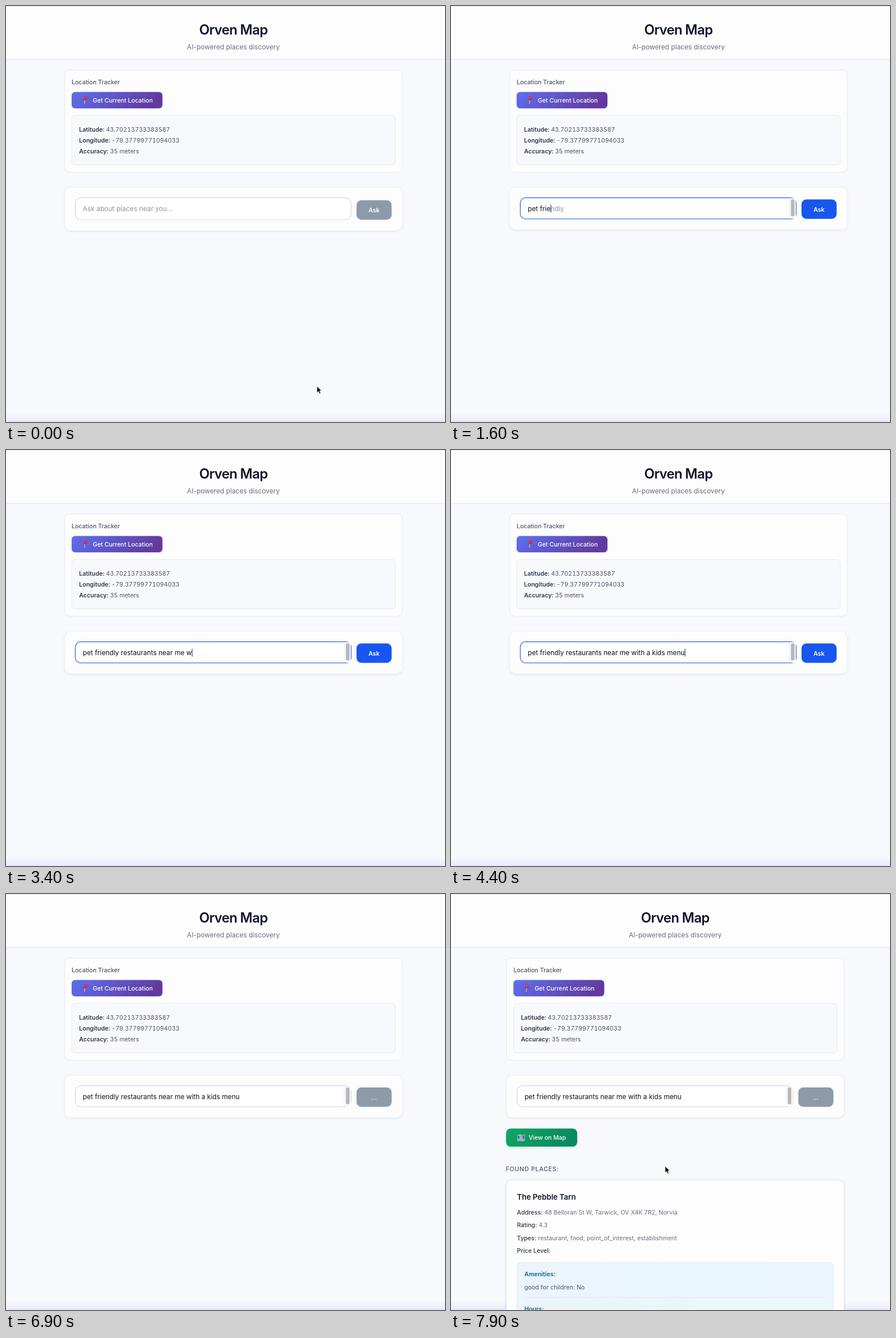
Write an HTML page that moves like this. It is 769 px wide and 728 px high and loops after 8 s.

```html
<!DOCTYPE html>
<html lang="en">
<head>
<meta charset="utf-8">
<title>Orven Map</title>
<style>
html, body { margin: 0; width: 100%; height: 100%; overflow: hidden; background: #f7f9fd; }
svg { display: block; width: 769px; height: 728px; font: 10.55px Inter, "Open Sans", sans-serif; }
text { white-space: pre; fill: #4c5568; }
.title { font-size: 23.7px; font-weight: 600; letter-spacing: -.7px; fill: #10132a; }
.sub { font-size: 11.75px; fill: #6b6f7e; }
.mid { font-weight: 500; }
.bold { font-weight: 600; fill: #30394b; }
.digits { font-variant-numeric: tabular-nums; }
.white { font-weight: 500; fill: #fff; }
.field { font-size: 11.75px; fill: #0e1016; }
.faint { fill: #8f929e; }
.label { font-weight: 500; fill: #2d3648; }
.value { fill: #686f7e; }
.blue { font-weight: 600; fill: #0f6596; }
.name { font-size: 13.1px; font-weight: 600; fill: #12162a; }
.caps { font-weight: 500; letter-spacing: .65px; fill: #50566c; }
.card { fill: #fdfdfd; stroke: #e6e8f2; }
.soft { filter: drop-shadow(0 1.5px 2px rgba(40, 44, 80, .13)); }
.glow { filter: drop-shadow(0 1px 1.5px rgba(80, 90, 190, .2)); }
.leaf { filter: drop-shadow(0 1.5px 2px rgba(20, 165, 100, .25)); }
</style>
</head>
<body>
<svg viewBox="0 0 769 728">
  <defs>
    <linearGradient id="violet" x1="0" y1="0" x2="1" y2=".2">
      <stop stop-color="#5d70ef"/><stop offset="1" stop-color="#623a9e"/>
    </linearGradient>
    <linearGradient id="green" x1="0" y1="0" x2="1" y2=".2">
      <stop stop-color="#12a563"/><stop offset="1" stop-color="#078a5f"/>
    </linearGradient>
    <linearGradient id="ice" x2="1">
      <stop stop-color="#ecf4fc"/><stop offset=".5" stop-color="#e9f7fb"/><stop offset="1" stop-color="#ecf7fc"/>
    </linearGradient>
    <linearGradient id="edge" x2="0" y2="1">
      <stop stop-color="#ecebfb" stop-opacity="0"/><stop offset="1" stop-color="#e9e8fa"/>
    </linearGradient>
  </defs>

  <rect width="769" height="728" fill="#f7f9fd"/>
  <rect width="769" height="93" fill="#fdfdfd"/>
  <path d="M0 .5H769M0 93.5H769" stroke="#e6e7f4"/>
  <rect y="712" width="769" height="16" fill="url(#edge)"/>

  <g id="page">
    <text class="title" x="398.3" y="50.3" text-anchor="middle">Orven Map</text>
    <text class="sub" x="398.3" y="75.6" text-anchor="middle">AI-powered places discovery</text>

    <rect class="card" x="103" y="112" width="591" height="179" rx="9"/>
    <text class="mid" x="115" y="137">Location Tracker</text>
    <rect class="glow" x="115" y="150.5" width="159" height="28.5" rx="6" fill="url(#violet)"/>
    <path d="M138.5 163L137.4 171" stroke="#b9bccb" stroke-width="1.3"/>
    <circle cx="138.8" cy="161.7" r="3.2" fill="#d8283c"/>
    <circle cx="137.9" cy="160.8" r=".9" fill="#f58a90"/>
    <text class="white" x="152" y="168.9">Get Current Location</text>
    <rect x="115" y="191.5" width="567" height="86.5" rx="6" fill="#f8f9fc" stroke="#e8e9f2"/>
    <g class="digits">
      <text x="128" y="219.8"><tspan class="bold">Latitude:</tspan> 43.70213733383587</text>
      <text x="128" y="239.2"><tspan class="bold">Longitude:</tspan> -79.37799771094033</text>
      <text x="128" y="258.4"><tspan class="bold">Accuracy:</tspan> 35 meters</text>
    </g>

    <rect id="panel" class="soft" x="103" y="317.5" width="591" height="75.5" rx="11" fill="#fdfdfd"/>
    <rect id="ring" x="119.7" y="334" width="486.6" height="42" rx="10.5" fill="#e6edfd"/>
    <rect id="box" x="121.5" y="335.7" width="483" height="38.3" rx="9" fill="#fff" stroke-width="1.2"/>
    <g id="bar">
      <rect x="592.5" y="336.3" width="11.4" height="35.6" fill="#fdfdfd"/>
      <path d="M592.5 337V372" stroke="#ececf2"/>
      <rect x="595.4" y="338.3" width="6.4" height="30" rx="3" fill="#b7b7b9"/>
    </g>
    <text id="hint" class="field faint" x="134.5" y="359.4">Ask about places near you...</text>
    <text class="field" x="134.5" y="359.4"><tspan id="typed"></tspan><tspan id="guess" class="faint"></tspan></text>
    <rect id="caret" y="348" width="1.4" height="13.5" fill="#2466dd"/>
    <g id="ask">
      <rect x="614" y="340" width="61.5" height="34" rx="8.5"/>
      <text id="askText" class="white" style="font-weight:600" x="644.6" y="361.4" text-anchor="middle">Ask</text>
    </g>
  </g>

  <g id="results">
    <rect class="leaf" x="96.5" y="410.5" width="124.5" height="31.5" rx="8" fill="url(#green)"/>
    <path d="M116 421.5l4.5-1 4.5 1 4.5-1v11.5l-4.5 1-4.5-1-4.5 1z" fill="#86b6cc"/>
    <path d="M117 423l3 0 1.5 3-2 3.5-2.5-3zM124 422.5l4.5 0v5l-3 2z" fill="#456f7c"/>
    <path d="M120.5 420.5v11.5M125 421.5v11.5" stroke="#cfe2ea" stroke-width=".7"/>
    <text class="white" x="136" y="430.4">View on Map</text>
    <text class="caps" x="96" y="485.3">FOUND PLACES:</text>
    <rect class="card soft" x="97" y="501" width="591.5" height="260" rx="9"/>
    <text class="name" x="115.5" y="534.6">The Pebble Tarn</text>
    <g id="facts"></g>
    <rect x="115.5" y="645" width="554.5" height="110" rx="6" fill="url(#ice)" stroke="#e2ebf7"/>
    <text class="blue" x="128.5" y="669.4">Amenities:</text>
    <text x="128.5" y="691.9">good for children: No</text>
    <path d="M128.5 706H657" stroke="#e0eaf5"/>
    <text class="blue" x="128.5" y="730.3">Hours:</text>
  </g>

  <g id="pointer">
    <path d="M0 0V11.8L2.7 9.3 4.6 13.5 6.7 12.6 4.9 8.5H8.5Z" fill="#0a0a0c" stroke="#fff" stroke-width=".9" stroke-linejoin="round"/>
    <g id="ban" fill="none">
      <circle cx="7" cy="18.5" r="5.9" fill="#f4f4f6" stroke="#fff" stroke-width="2.6"/>
      <path d="M3.2 14.7L10.8 22.3" stroke="#95979f" stroke-width="1.5"/>
      <circle cx="7" cy="18.5" r="5.5" stroke="#95979f" stroke-width="1.5"/>
    </g>
  </g>
</svg>
<script>
const LOOP = 8000, STEP = 100;
const QUERY = "pet friendly restaurants near me with a kids menu";
const GREY = [140, 154, 170], BLUE = [24, 86, 240], DARK = [12, 67, 224];
const IDLE = [211, 213, 234], FOCUS = [58, 108, 226];

// Each track is a list of [time, value or values].
const TYPING = [[1050, 0], [1600, 8.2], [3400, 34.2], [4400, 49]];
const ASK = [[1100, GREY], [1300, BLUE], [4900, BLUE], [5100, DARK], [5200, DARK], [5400, GREY]];
const BORDER = [[400, IDLE], [500, FOCUS], [5100, FOCUS], [5300, IDLE]];
const POINTER = [
  [0, [544.6, 665.2]], [400, [271.6, 362.4]], [4600, [271.6, 362.4]], [5000, [655, 358.5]],
  [6300, [655, 358.5]], [6700, [700, 745]], [7100, [420, 745]], [7700, [375, 476.2]]
];
const FADE = [[7000, 0], [7300, 1]];

const FACTS = [
  ["Address:", "48 Belloran St W, Tarwick, OV X4K 7R2, Norvia"],
  ["Rating:", "4.3"],
  ["Types:", "restaurant, food, point_of_interest, establishment"],
  ["Price Level:", ""]
];

const $ = id => document.getElementById(id);
const rgb = c => `rgb(${c.map(Math.round)})`;
const show = (el, on) => el.setAttribute("visibility", on ? "visible" : "hidden");
const ease = p => p * p * (3 - 2 * p);

function at(track, t, curve = p => p) {
  const next = track.findIndex(k => k[0] > t);
  if (next === 0) return track[0][1];
  if (next < 0) return track[track.length - 1][1];
  const [t0, a] = track[next - 1], [t1, b] = track[next];
  const p = curve((t - t0) / (t1 - t0));
  return Array.isArray(a) ? a.map((v, i) => v + (b[i] - v) * p) : a + (b - a) * p;
}

$("facts").innerHTML = FACTS.map(([label, value], i) =>
  `<text x="115.5" y="${560.8 + i * 22.4}"><tspan class="label">${label}</tspan><tspan class="value"> ${value}</tspan></text>`
).join("");

function draw(t) {
  const count = Math.floor(at(TYPING, t));
  const focused = t >= 500 && t < 5200;
  const rise = count ? 1.5 : 0;
  const lift = t >= 5000 && t < 5300 ? 0.7 : 0;

  $("typed").textContent = QUERY.slice(0, count);
  $("guess").textContent = count > 6 && count < 12 ? QUERY.slice(count, 12) : "";
  show($("hint"), !count);
  show($("bar"), count);
  show($("ring"), focused);
  $("caret").setAttribute("x", 134.4 + (count ? $("typed").getComputedTextLength() : 0));
  show($("caret"), focused && (t < 4900 || t % 1000 < 500));

  $("panel").setAttribute("height", 75.5 - rise);
  $("ring").setAttribute("height", 42 - rise);
  $("box").setAttribute("height", 38.3 - rise);
  $("box").setAttribute("stroke", rgb(at(BORDER, t)));
  $("ask").setAttribute("transform", `translate(0 ${-rise - lift})`);
  $("ask").firstElementChild.setAttribute("fill", rgb(at(ASK, t)));
  $("askText").textContent = t < 5300 ? "Ask" : "...";

  const fade = at(FADE, t);
  $("page").setAttribute("transform", `translate(${fade ? -5.6 : 0} 0)`);
  $("results").setAttribute("opacity", fade);

  const [x, y] = at(POINTER, t, ease);
  $("pointer").setAttribute("transform", `translate(${x} ${y})`);
  show($("pointer"), t < 1100 || t >= 4600);
  $("ban").setAttribute("opacity", t >= 5200 && t < 6400 ? 1 : 0);
}

function tick() {
  const t = performance.now() % LOOP;
  draw(Math.floor(t / STEP) * STEP);
  requestAnimationFrame(tick);
}
tick();
</script>
</body>
</html>
```
